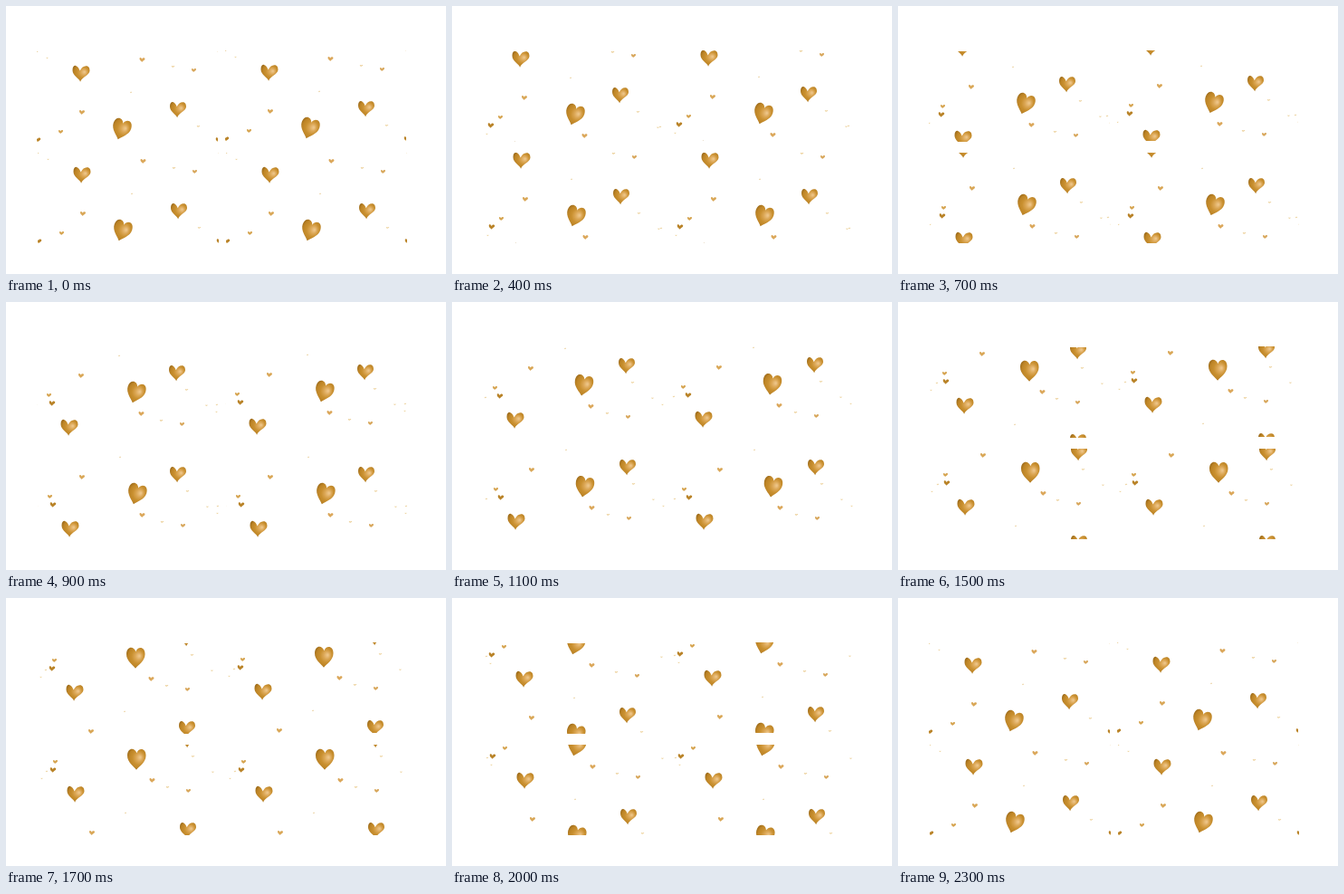
Animation of 486x296 px, one loop 2.4 s. Source, as an HTML page with a canvas:

```html
<!DOCTYPE html>
<html lang="en">
<head>
<meta charset="utf-8">
<title>Rising golden hearts</title>
<style>
  html, body { margin: 0; width: 100%; height: 100%; overflow: hidden; background: #fff; }
  canvas { display: block; width: 486px; height: 296px; }
</style>
</head>
<body>
<canvas id="stage" width="486" height="296"></canvas>
<script>
const W = 200, H = 100, STEP = 100, STEPS = 24;
const stage = document.getElementById('stage').getContext('2d');
const tileCanvas = document.createElement('canvas');
tileCanvas.width = W;
tileCanvas.height = H;
const tile = tileCanvas.getContext('2d');

const TILES = [[34, 50], [242, 49], [35, 162], [243, 162]];

// Sideways drift, and the tilt of the large heart, at these steps
const KEYS = [0, 4, 9, 13, 17, 20, 23];
const DRIFT = {
  left: [0, -7, -13, -11, -7, -3, 0],
  right: [0, 8, 16, 18, 16, 9, 0],
  wave: [0, -4, -1, 7, 10, 4, 0]
};
const TILT = [18, 18, 17, 4, 1, 15, 18];

// Unit shapes: a full heart, and an open one with a deep notch
const FULL = new Path2D('M0 .5C-.14 .34-.5 .14-.5-.18C-.5-.56-.1-.58 0-.3' +
  'C.1-.58 .5-.56 .5-.18C.5 .14 .14 .34 0 .5Z');
const OPEN = new Path2D('M-.05 .5C-.1 .3-.5 .14-.5-.2C-.5-.42-.42-.5-.32-.49' +
  'C-.2-.46-.12-.32-.07-.18C.02-.38 .14-.46 .28-.47C.44-.48 .5-.34 .5-.18C.48 .1 .06 .2-.05 .5Z');

// x, y, width, height, drift, colour (none = shaded)
const HEARTS = [
  [49, 24.7, 19, 18, 'left'],
  [93.2, 86.2, 20.5, 23, 'right'],
  [156, 64.5, 18, 17.5, 'wave'],
  [1, 98, 6.5, 5.5, 'right', '#b98328'],
  [116.5, 9.5, 6, 5, 'wave', '#dba75a'],
  [50, 67.5, 6, 5, 'wave', '#d9a757'],
  [26.5, 89, 5, 4.2, 'left', '#d6a450'],
  [173.5, 21, 5, 4.2, 'left', '#d8a75c'],
  [150.5, 17, 3.5, 2.2, 'left', '#ecd09a'],
  [178.5, 83, 3.5, 2.2, 'left', '#efd6a4'],
  [104, 45.5, 2, 1.4, 'left', '#e9cf9c'],
  [11.5, 7.5, 2, 1.4, 'left', '#edd39c'],
  [0.5, 0.2, 2.5, 1.6, 'left', '#ecd3a0'],
  [0, 99.5, 2.5, 1.6, 'wave', '#ecd3a0']
];
const LARGE = HEARTS[1];

const shade = tile.createRadialGradient(0.2, -0.1, 0.03, 0.05, -0.05, 0.58);
[[0, '#edc487'], [0.28, '#dba654'], [0.55, '#c99030'], [0.82, '#bd8426'], [1, '#a06e1c']]
  .forEach(([at, colour]) => shade.addColorStop(at, colour));

// Smooth curve through the key values
function sample(values, s) {
  let i = 0;
  while (i < KEYS.length - 2 && s >= KEYS[i + 1]) i++;
  const slope = k => {
    const a = Math.max(k - 1, 0), b = Math.min(k + 1, KEYS.length - 1);
    return (values[b] - values[a]) / (KEYS[b] - KEYS[a]);
  };
  const span = KEYS[i + 1] - KEYS[i], u = (s - KEYS[i]) / span;
  const u2 = u * u, u3 = u2 * u;
  return values[i] * (2 * u3 - 3 * u2 + 1) + values[i + 1] * (3 * u2 - 2 * u3)
    + span * (slope(i) * (u3 - 2 * u2 + u) + slope(i + 1) * (u3 - u2));
}

const rise = s => 4 * s + Math.max(0, s - 15);
const wrap = (v, size) => ((v % size) + size) % size;

function drawHeart(path, x, y, w, h, angle, fill) {
  tile.save();
  tile.translate(x, y);
  tile.rotate(angle * Math.PI / 180);
  tile.scale(w, h);
  tile.fillStyle = fill;
  tile.fill(path);
  tile.restore();
}

function drawTile(s) {
  tile.clearRect(0, 0, W, H);
  for (const heart of HEARTS) {
    const [x0, y0, w, h, drift, colour] = heart;
    const x = wrap(x0 + Math.round(sample(DRIFT[drift], s)), W);
    const y = wrap(y0 - rise(s), H);
    const path = heart === LARGE ? FULL : OPEN;
    const angle = heart === LARGE ? sample(TILT, s) : 0;
    for (const dx of [-W, 0, W])
      for (const dy of [-H, 0, H])
        drawHeart(path, x + dx, y + dy, w, h, angle, colour || shade);
  }
}

let shown = -1;
function frame() {
  const s = Math.floor(performance.now() / STEP) % STEPS;
  if (s !== shown) {
    shown = s;
    drawTile(s);
    stage.fillStyle = '#fff';
    stage.fillRect(0, 0, 486, 296);
    for (const [x, y] of TILES) stage.drawImage(tileCanvas, x, y);
  }
  requestAnimationFrame(frame);
}
frame();
</script>
</body>
</html>
```
